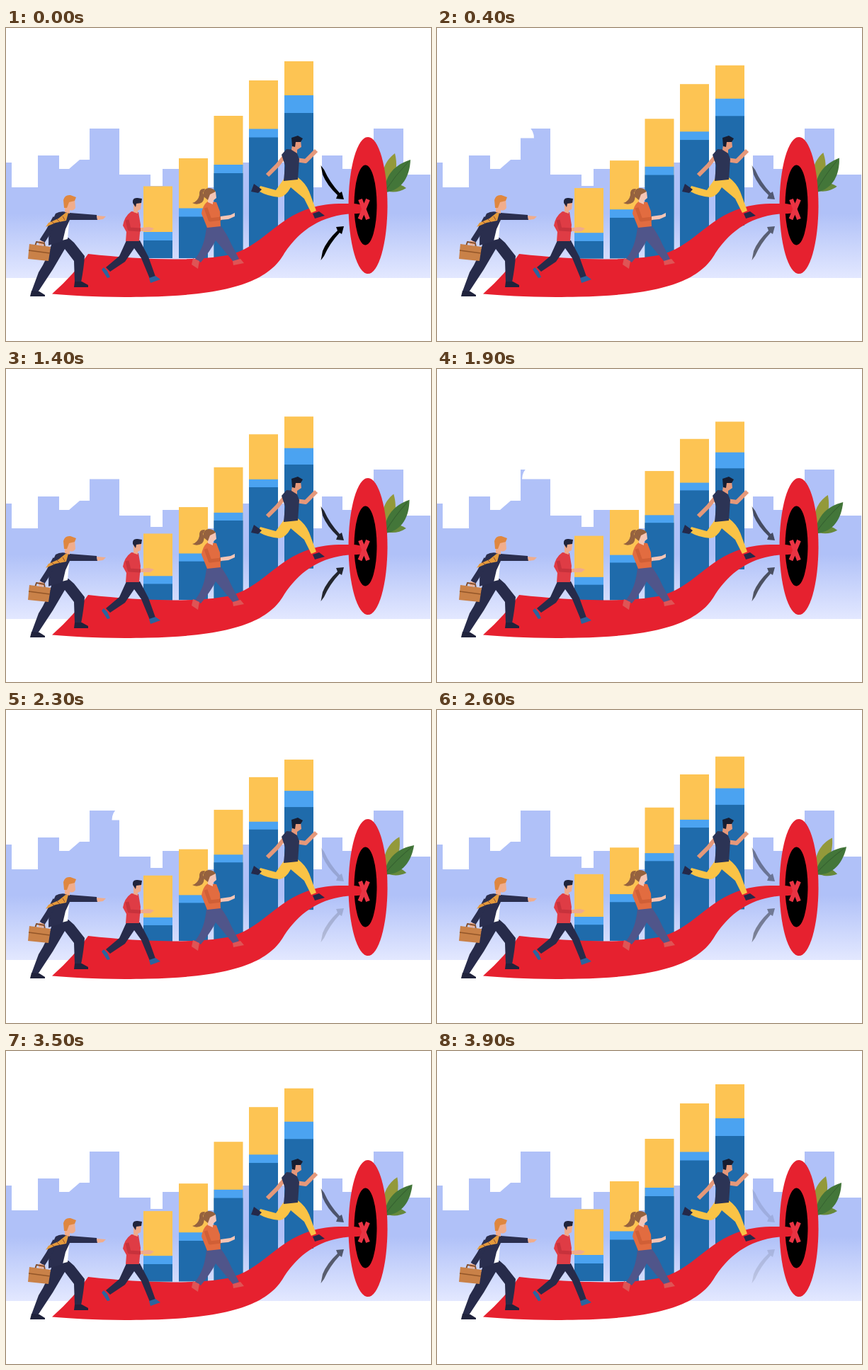
These frames come from a looping animation (600x442 px, 4 s). An HTML page:

```html
<!DOCTYPE html>
<html lang="en">
<head>
<meta charset="utf-8">
<title>Run to the goal</title>
<style>
html, body { margin: 0; width: 100%; height: 100%; overflow: hidden; background: #fff }
svg { display: block }
.limb { fill: none; stroke-linejoin: round }
</style>
</head>
<body>
<svg width="600" height="442" viewBox="0 0 600 442">
  <defs>
    <linearGradient id="haze" gradientUnits="userSpaceOnUse" x1="0" y1="262" x2="0" y2="353">
      <stop stop-color="#b0c1f8"/><stop offset="1" stop-color="#e3e8ff"/>
    </linearGradient>
  </defs>

  <path id="skyline" fill="url(#haze)" d="M0 190H8V225H45V180H75V199H89L104 186H118V142H160V207H204V223H221V199H264V225H334V190H409V225H446V180H475V199H505V207H519V142H561V207H599V353H0Z"/>
  <path id="cloud" fill="#fff" d="M0 155.500A30 25 0 0 1 30 130H97A30 25 0 0 1 127 155.500Z"/>

  <g id="bars"></g>

  <g id="leaves">
    <path fill="#93993a" d="M533 227C528 206 534 188 549 177C554 197 550 215 536 228Z"/>
    <path fill="#66893b" d="M533 226C542 217 554 218 565 226C554 233 541 233 533 228Z"/>
    <path fill="#437639" d="M534 230C536 207 549 193 571 186C570 209 560 228 537 232Z"/>
    <path class="limb" stroke="#356130" d="M536 229Q549 209 568 189"/>
  </g>

  <g id="arrows">
    <path id="arrow" d="M444.500 194L447 207Q453 222 468 236L466 241L477 242L474 231L471 233Q457 218 449 200Z"/>
    <use href="#arrow" transform="matrix(1 0 0 -1 0 522)"/>
  </g>

  <ellipse cx="511" cy="250.500" rx="27.500" ry="96.500" fill="#e6212f"/>
  <ellipse cx="507.500" cy="250" rx="16" ry="56.500"/>
  <path fill="#e6212f" d="M116 319C190 327 262 330 312 321C372 308 386 250 470 248H490Q508 249 508 256Q506 263 490 262C445 265 416 284 393 318C374 352 330 377 200 379.500C140 381 95 378 65 375.500Q97 347 116 319Z"/>
  <path class="limb" stroke="#e93343" stroke-width="6" d="M500 242L511 270M511 242L499.500 270"/>

  <g id="businessman">
    <path fill="#272b4a" d="M66 300Q59 325 46 345L36 372L45 373L66 341L83 312L96 329L97 359H106Q110 338 111 322L96 303L88 296Z"/>
    <path fill="#20233c" d="M36 371L47 372L55 377V379H34ZM97 358H107L116 363V366H96Z"/>
    <path fill="#fff" d="M82 261L90 262L87 298L79 300Z"/>
    <path fill="#2a2e4e" d="M70 262Q78 257 90 261L128 264L129 271L90 271L84 284L80 301L60 307Q59 282 70 262Z"/>
    <path class="limb" stroke="#2a2e4e" stroke-width="8" d="M70 268L60 287L51 301"/>
    <path fill="#e49a3b" d="M88 261L85 272L70 275L56 281L60 275L74 269L84 261Z"/>
    <path class="limb" stroke="#8d4a35" d="M64 273L68 276M72 270L76 274M80 266L83 271"/>
    <path fill="#f0ad8c" d="M83 242H97L98 254Q95 259 90 257V262L83 260ZM128 265L141 266L137 270L129 271ZM47 300L54 302L52 307L46 306Z"/>
    <path fill="#df873f" d="M81 243Q83 235 91 236L99 239L97 244L89 246L86 254L82 254Z"/>
    <path class="limb" stroke="#84502f" stroke-width="2" d="M41 308L43 302L54 304L55 310"/>
    <path fill="#c98148" d="M33 305L63 309L60 329L31 326Z"/>
    <path class="limb" stroke="#935629" stroke-width="1.500" d="M32 314L62 318"/>
  </g>

  <g id="runner">
    <path fill="#272b4a" d="M170 300H189L201 323L211 351L203 354L191 325L181 311L168 330L147 344L141 338L160 322Z"/>
    <path fill="#2b659f" d="M138 338L143 343L147 352L143 353L135 341ZM202 353L211 350L218 355L204 360Z"/>
    <path fill="#df3c45" d="M177 259L187 260L190 278L188 301L169 301L170 288L165 279Q167 266 177 259Z"/>
    <path class="limb" stroke="#c7323c" stroke-width="5" d="M171 271L174 284L190 285"/>
    <path fill="#efab8c" d="M180 247H191L190 256L186 258V262L180 260ZM190 282L202 281L209 283L204 287H190Z"/>
    <path fill="#20243c" d="M179 247Q178 239 186 240L192 241L191 247L184 248L183 253Z"/>
  </g>

  <g id="woman">
    <path fill="#50558a" d="M283 280L303 279Q312 291 318 305L329 326L321 330L306 312L296 300Q289 314 275 331L267 326Q281 308 283 280Z"/>
    <path fill="#df5455" d="M264 325L273 329L271 340L262 334ZM320 329L331 326L336 332L321 335Z"/>
    <path fill="#e26c40" d="M285 245L297 246L302 259L303 280L284 282L276 262Q278 249 285 245Z"/>
    <path class="limb" stroke="#d05f36" stroke-width="5" d="M282 254L288 271L304 269"/>
    <path fill="#f5c5b5" d="M284 231H296L297 240L292 244V249L285 246ZM303 266L317 264L323 261V266L314 270L303 271Z"/>
    <path fill="#95623f" d="M279 238Q277 227 286 226Q293 226 296 231L288 235L285 243Z"/>
    <path fill="#95623f" d="M281 227Q272 226 273 236Q271 245 263 247Q270 251 277 246Q282 239 278 233Z"/>
  </g>

  <g id="leader">
    <path class="limb" stroke="#e5987a" stroke-width="6" d="M395 179L383 194L369 208M409 186L423 188L438 173"/>
    <path fill="#fac346" d="M393 212L412 211Q423 219 428 231L438 258L431 261L421 241L402 225Q395 238 386 239Q370 238 356 230L359 223L381 229Z"/>
    <path fill="#24294a" d="M350 220L361 228L356 233L346 231ZM433 262L442 259L450 265L436 269Z"/>
    <path fill="#2c3455" d="M396 171L409 172L414 185L412 214L392 216L394 194L389 179Z"/>
    <path fill="#e5987a" d="M405 158H416L417 168L411 172V177L403 172Z"/>
    <path fill="#171d31" d="M403 155L412 152L419 156L416 161L409 161L408 168L404 167Z"/>
  </g>
</svg>
<script>
const $ = id => document.getElementById(id);
const LOOP = 4000, STEP = 100, CYCLE = LOOP - STEP;

// x, foot, scaling base and the tops of the yellow, light blue and dark blue parts
const bars = [
  [194, 325, 348, 223.5, 288, 300],
  [244, 325, 338, 184, 254.5, 266.5],
  [293.5, 325, 330, 124, 193, 205],
  [343, 310, 328, 74, 142.5, 154.5],
  [393, 278, 328, 47, 95, 120]
];
const colors = ['#fdc453', '#4ba3f1', '#1f6bab'];

$('bars').innerHTML = bars.map(([x, foot, base, ...tops]) => '<g>' + tops.map((y, i) =>
  `<rect x="${x}" y="${y}" width="41" height="${foot - y}" fill="${colors[i]}"/>`).join('') + '</g>').join('');
const barGroups = [...$('bars').children];

// 0 at the ends of each period, 1 in its middle
const triangle = (t, period) => 1 - Math.abs(1 - 2 * (t / period % 1));

function leafAngle(t) {
  const low = 800, high = 2700;
  if (t < low) return -7.8 * t / low;
  if (t < high) return -7.8 + 18.8 * (t - low) / (high - low);
  return 11 * (CYCLE - t) / (CYCLE - high);
}

function draw(now) {
  const t = Math.floor(now % LOOP / STEP) * STEP;
  const scale = 1 - 0.1 * triangle(t, CYCLE);
  barGroups.forEach((g, i) => {
    const base = bars[i][2];
    g.setAttribute('transform', `matrix(1 0 0 ${scale} 0 ${base * (1 - scale)})`);
  });
  $('arrows').setAttribute('opacity', 1 - 0.9 * triangle(t, CYCLE / 2.5));
  $('leaves').setAttribute('transform', `rotate(${leafAngle(t)} 533 230)`);
  $('cloud').setAttribute('transform', `translate(${0.0735 * t - 19.5})`);
  requestAnimationFrame(() => draw(performance.now()));
}
draw(0);
</script>
</body>
</html>
```
